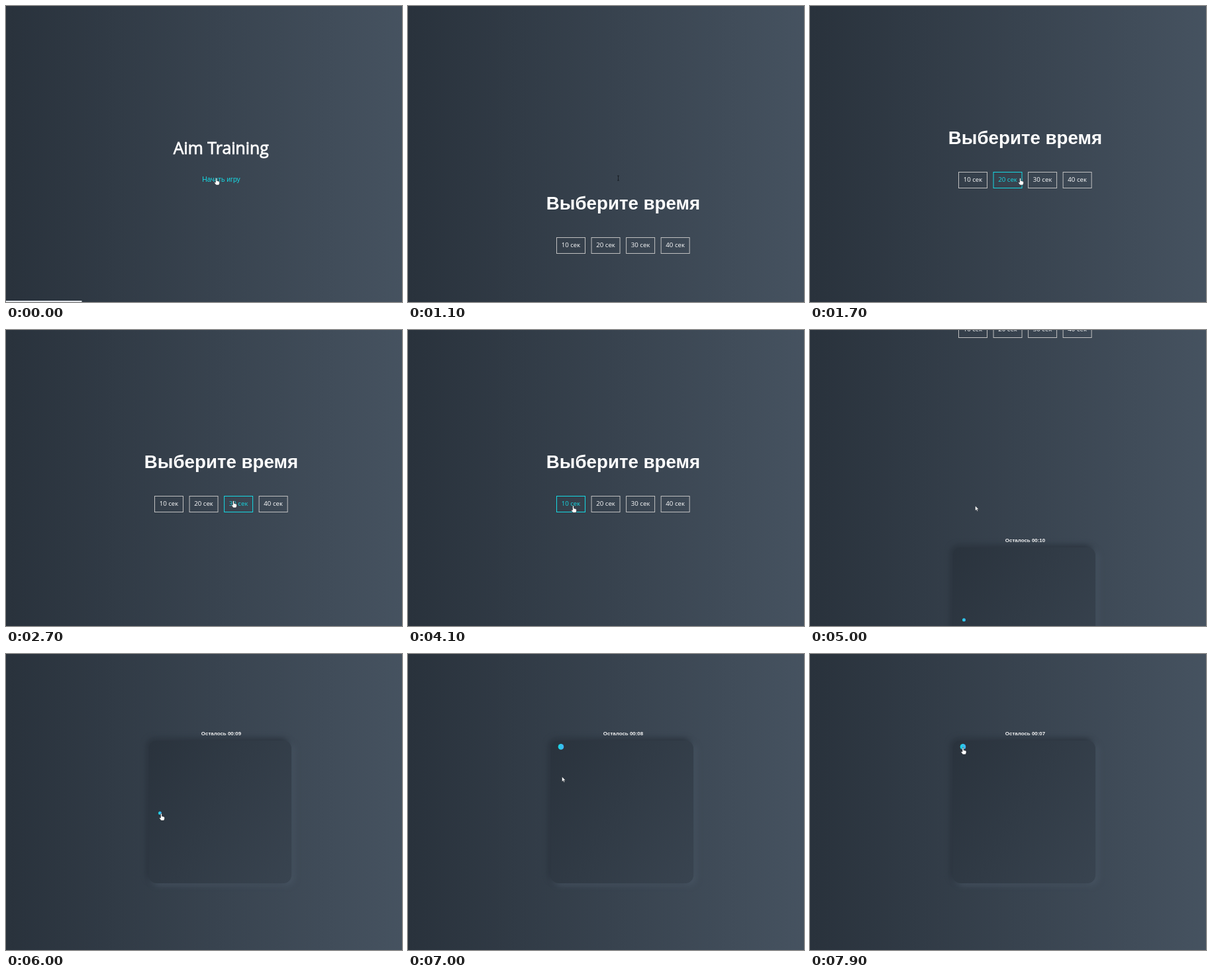
Animation of 598 by 448 pixels, one loop 8 s. Source, as an HTML page:

```html
<!DOCTYPE html>
<html lang="ru">
<head>
<meta charset="utf-8">
<title>Aim Training</title>
<style>
  html, body { margin: 0; width: 100%; height: 100%; overflow: hidden; background: #29323c; }
  svg { display: block; width: 598px; height: 448px; }
  text { fill: #fff; text-anchor: middle; font-family: "Liberation Sans", Arial, sans-serif; }
  .title { font: 24.8px "Open Sans", sans-serif; stroke: #fff; stroke-width: .8px; }
  .link { font-size: 10.4px; fill: #16d9e3; }
  .choose { font-size: 27.7px; font-weight: bold; }
  .time { font-size: 7.95px; font-weight: bold; }
  .btn rect { fill: none; stroke: #c0c0c0; }
  .btn text { font: 9.7px "Open Sans", sans-serif; }
  .btn.hover rect { stroke: #16d9e3; }
  .btn.hover text { fill: #16d9e3; }
  #cursor path { display: none; }
  #cursor.hand .hand, #cursor.arrow .arrow, #cursor.beam .beam { display: inline; }
</style>
</head>
<body>
<svg viewBox="0 0 598 448">
  <defs>
    <linearGradient id="page" gradientUnits="userSpaceOnUse" x1="0" x2="650" y1="0" y2="0">
      <stop stop-color="#29323c"/><stop offset="1" stop-color="#485563"/>
    </linearGradient>
    <linearGradient id="panel" x1="-.151" y1=".148" x2="2.293" y2="1.469">
      <stop stop-color="#29323c"/><stop offset="1" stop-color="#485563"/>
    </linearGradient>
    <linearGradient id="dot">
      <stop stop-color="#16d9e3"/><stop offset=".47" stop-color="#30c7ec"/><stop offset="1" stop-color="#46aef7"/>
    </linearGradient>
    <filter id="blur" x="-20%" y="-20%" width="140%" height="140%" color-interpolation-filters="sRGB">
      <feGaussianBlur stdDeviation="4.3"/>
    </filter>
  </defs>

  <rect width="598" height="448" fill="url(#page)"/>

  <g id="screens">
    <text class="title" x="324.8" y="224">Aim Training</text>
    <text class="link" x="325" y="265.7">Начать игру</text>

    <g id="times" transform="translate(0 462)">
      <text class="choose" x="325" y="208.5">Выберите время</text>
    </g>

    <g transform="translate(0 924)">
      <text class="time" id="left" x="325" y="122.5"></text>
      <g transform="translate(215.5 131)">
        <rect x="4.3" y="3" width="215.5" height="216" rx="12" fill="#475462" filter="url(#blur)"/>
        <rect x="-3.5" y="-3.5" width="215.5" height="216" rx="12" fill="#2a333d" filter="url(#blur)"/>
        <rect width="215.5" height="216" rx="12" fill="url(#panel)"/>
      </g>
      <circle id="target" fill="url(#dot)"/>
    </g>
  </g>

  <rect id="status" y="446" width="114.5" height="2" fill="#dfe3e8"/>

  <g id="cursor">
    <path class="hand" fill="#fff" stroke="#20262e" stroke-width=".6"
      d="M-1 .6Q0-.8 1 .6V4L3 4.4Q5 4.8 5 6V8L4 10.5H-.3L-3 7Q-3 5.6-1 6.6Z"/>
    <path class="arrow" fill="#fff" stroke="#20262e" stroke-width=".5"
      d="M0 0V7.5L1.8 5.9 3 8.6 4.2 8.1 3 5.4H5.3Z"/>
    <path class="beam" fill="none" stroke="#14181e" stroke-width=".8"
      d="M-1.5-3.5H1.5M0-3.5V3.5M-1.5 3.5H1.5"/>
  </g>
</svg>

<script>
const LOOP = 8000, STEP = 100, PAGE = 462, START = 4800, HIT = 6200;
const $ = id => document.getElementById(id);
const clamp = (v, a, b) => Math.min(b, Math.max(a, v));

// Pointer path: time, x, y
const path = [
  [0, 317.5, 260.5], [1900, 317.5, 260.5], [2300, 240, 264], [2700, 343.5, 258.5],
  [2800, 377, 263], [2900, 400, 262], [3300, 405, 264], [3500, 405, 264],
  [4100, 249.5, 266], [5100, 249.5, 266], [5600, 248, 240], [6000, 234.5, 241.5],
  [6300, 234.5, 241.5], [7600, 231, 141.5], [LOOP, 231, 141.5]
];

const buttons = [10, 20, 30, 40].map((sec, i) => {
  const x = 224.5 + i * 52.55;
  $('times').insertAdjacentHTML('beforeend',
    `<g class="btn"><rect x="${x}" y="251.5" width="43" height="24"/>` +
    `<text x="${x + 21.5}" y="265.6">${sec} сек</text></g>`);
  return { x, el: $('times').lastElementChild };
});

// cubic-bezier(0, 0, .58, 1)
function easeOut(p) {
  let a = 0, b = 1;
  for (let i = 0; i < 24; i++) {
    const s = (a + b) / 2;
    if (1.74 * s * s - .74 * s ** 3 < p) a = s; else b = s;
  }
  return 3 * a * a - 2 * a ** 3;
}

const slide = ms => PAGE * easeOut(clamp(ms / 500, 0, 1));

function pointer(t) {
  const i = path.findIndex(p => p[0] > t);
  const [t0, x0, y0] = path[i - 1], [t1, x1, y1] = path[i];
  const p = (t - t0) / (t1 - t0), k = p * p * (3 - 2 * p);
  return [x0 + (x1 - x0) * k, y0 + (y1 - y0) * k];
}

function draw(t) {
  // The first slide stalls for one step
  const first = Math.min(t - 700, Math.max(200, t - 800));
  const scroll = slide(first) + slide(t - START);
  const [x, y] = pointer(t), py = y + scroll;
  const inside = (l, top, r, b) => x >= l && x <= r && py >= top && py <= b;

  const [cx, cy, r] = t < HIT ? [232.5, 240.7, 2.5] : [231, 140.4, 4.3];
  const dot = $('target');
  dot.setAttribute('cx', cx);
  dot.setAttribute('cy', cy);
  dot.setAttribute('r', r);

  let kind = inside(211, 620, 438, 685) ? 'beam' : 'arrow';
  if (inside(297, 256, 353, 268) || Math.hypot(x - cx, py - 2 * PAGE - cy) < r) kind = 'hand';
  for (const b of buttons) {
    const over = inside(b.x, 713, b.x + 43.5, 738);
    b.el.classList.toggle('hover', over);
    if (over) kind = 'hand';
  }

  $('cursor').setAttribute('class', kind);
  $('cursor').setAttribute('transform', `translate(${x} ${y})`);
  $('screens').setAttribute('transform', `translate(0 ${-Math.round(scroll)})`);
  $('status').style.display = t < 800 ? '' : 'none';
  const sec = 10 - Math.floor(Math.max(0, t - START) / 1000);
  $('left').textContent = 'Осталось 00:' + String(sec).padStart(2, '0');
}

const begin = performance.now();
function tick() {
  const t = (performance.now() - begin) % LOOP;
  draw(Math.floor(t / STEP) * STEP);
  requestAnimationFrame(tick);
}
tick();
</script>
</body>
</html>
```
